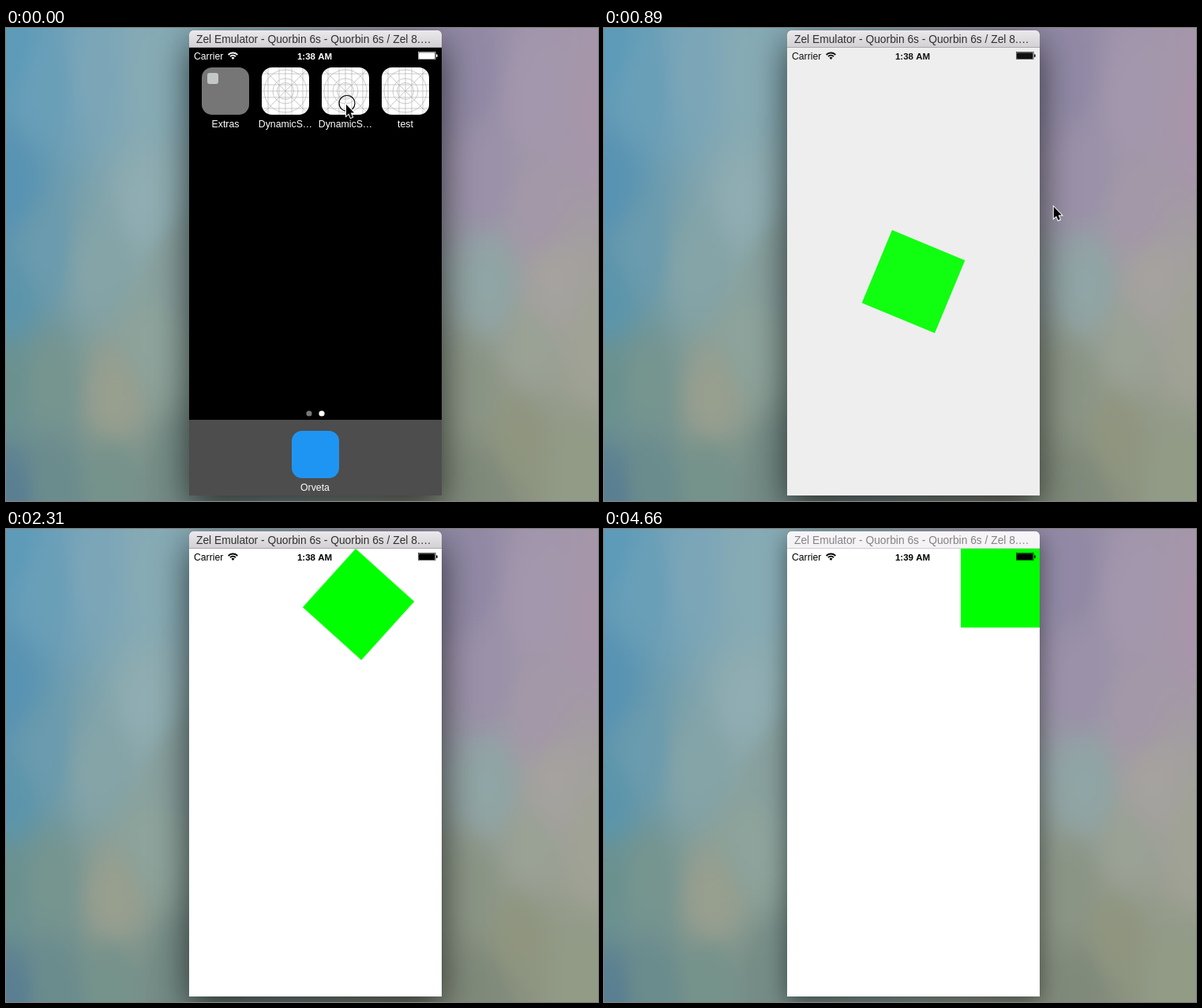
Recreate the animation shown at these times as an HTML page with a canvas. Size 750 by 600 pixels, loop 4680 ms.

```html
<!DOCTYPE html>
<html lang="en">
<head>
<meta charset="utf-8">
<title>Gravity demo</title>
<style>
  html, body { margin: 0; width: 100%; height: 100%; overflow: hidden; }
  canvas { display: block; width: 750px; height: 600px; }
</style>
</head>
<body>
<canvas id="stage" width="750" height="600"></canvas>
<script>
const LOOP = 4680;
const SCREEN = { x: 232, y: 25, w: 320, h: 568 };
const FONT = '"Liberation Sans", Arial, sans-serif';
const ctx = document.getElementById('stage').getContext('2d');

const clamp = v => Math.max(0, Math.min(1, v));
const mix = (a, b, p) => a + (b - a) * p;

// Piecewise linear track; each key is [time, ...values].
function track(keys, t) {
  const i = keys.findIndex(k => k[0] > t);
  if (i === 0) return keys[0].slice(1);
  if (i < 0) return keys[keys.length - 1].slice(1);
  const a = keys[i - 1], b = keys[i], p = (t - a[0]) / (b[0] - a[0]);
  return a.slice(1).map((v, n) => mix(v, b[n + 1], p));
}

const CURSOR = [[660, 431, 97], [890, 571, 228], [1170, 677, 312], [1340, 682, 317], [1500, 693, 336]];
const ANGLE = [[1442, 22.5], [1495, 0], [1740, -27], [2025, -39], [2310, -47.8], [2600, -58.5], [2880, -77], [2990, -90]];
const PIVOT = [[1495, 442], [2310, 443], [2880, 440.5], [2990, 440.5], [3400, 452]];

function roundRect(x, y, w, h, r, fill) {
  ctx.beginPath();
  ctx.roundRect(x, y, w, h, r);
  ctx.fillStyle = fill;
  ctx.fill();
}

function dot(x, y, r, fill) {
  ctx.beginPath();
  ctx.arc(x, y, r, 0, 7);
  ctx.fillStyle = fill;
  ctx.fill();
}

function text(str, x, y, size, fill, align = 'center', weight = '') {
  ctx.font = `${weight} ${size}px ${FONT}`;
  ctx.textAlign = align;
  ctx.fillStyle = fill;
  ctx.fillText(str, x, y);
}

// Blurred wallpaper: colours blended between a few points.
function makeWallpaper() {
  const points = [
    [0, 20, '5d9bb8'], [0, 200, '5893b3'], [0, 340, '5b95ac'], [0, 450, '6b918f'], [0, 595, '5a7f92'],
    [50, 70, '6a9fb8'], [45, 280, '6a9bae'], [50, 450, '76958f'], [60, 580, '6b8c8d'],
    [110, 60, '7ca6b8'], [110, 300, '84a4a8'], [135, 470, '989f8f'], [130, 570, '75928b'],
    [180, 60, '87abb5'], [180, 220, '8fadb2'], [185, 400, '8da39b'], [215, 300, '879f9d'], [210, 570, '758c86'],
    [580, 60, '9189a5'], [600, 190, '9b91a9'], [608, 325, '90a5a5'], [590, 450, '8b9586'], [600, 585, '808a7b'],
    [670, 90, 'a397ad'], [745, 110, 'a796aa'], [670, 235, 'a398a8'], [690, 320, 'a5a29f'],
    [745, 400, 'a1a296'], [660, 410, '9aa195'], [645, 510, '8f957f'], [725, 560, '919b86']
  ].map(([x, y, hex]) => [x, y, ...hex.match(/../g).map(c => parseInt(c, 16))]);
  const small = document.createElement('canvas');
  small.width = 150;
  small.height = 120;
  const g = small.getContext('2d');
  for (let y = 0; y < 120; y++) for (let x = 0; x < 150; x++) {
    const sum = [0, 0, 0];
    let total = 0;
    for (const [px, py, ...rgb] of points) {
      const d = (x * 5 - px) ** 2 + ((y * 5 - py) * 0.6) ** 2;
      const w = 1 / (d + 350) ** 2;
      total += w;
      rgb.forEach((c, i) => sum[i] += c * w);
    }
    g.fillStyle = `rgb(${sum.map(c => Math.round(c / total))})`;
    g.fillRect(x, y, 1, 1);
  }
  return small;
}
const wallpaper = makeWallpaper();

function drawWindow(active) {
  ctx.drawImage(wallpaper, 0, 0, 750, 600);
  ctx.save();
  ctx.shadowColor = `rgba(0,0,0,${active ? 0.65 : 0.5})`;
  ctx.shadowBlur = active ? 46 : 30;
  ctx.shadowOffsetY = active ? 16 : 9;
  roundRect(232, 3, 320, 590, [5, 5, 0, 0], '#000');
  ctx.restore();
  const bar = ctx.createLinearGradient(0, 3, 0, 25);
  bar.addColorStop(0, active ? '#ece9ec' : '#f7f5f7');
  bar.addColorStop(1, active ? '#d2d0d2' : '#f4f2f4');
  roundRect(232, 3, 320, 22, [5, 5, 0, 0], bar);
  ctx.fillStyle = active ? '#aaa8aa' : '#d0ced0';
  ctx.fillRect(232, 24, 320, 1);
  text('Zel Emulator - Quorbin 6s - Quorbin 6s / Zel 8.…', 241, 19, 13.8, active ? '#303030' : '#858385', 'left');
}

function drawStatus(color, time) {
  text('Carrier', 238, 39.5, 12.2, color, 'left');
  text(time, 391, 39.5, 11.5, color, 'center', 'bold');
  ctx.strokeStyle = color;
  ctx.lineWidth = 1.9;
  for (const r of [8, 4.8]) {
    ctx.beginPath();
    ctx.arc(287.5, 39.5, r, -Math.PI * 0.76, -Math.PI * 0.24);
    ctx.stroke();
  }
  ctx.beginPath();
  ctx.moveTo(287.5, 40);
  ctx.arc(287.5, 39.5, 2.7, -Math.PI * 0.76, -Math.PI * 0.24);
  ctx.fillStyle = color;
  ctx.fill();
  ctx.lineWidth = 0.6;
  ctx.strokeRect(522.3, 30.6, 21.8, 9);
  roundRect(523, 31.2, 20.4, 7.8, 1, color);
  roundRect(545, 33.2, 1.6, 3.8, 0.8, color);
}

function drawGridIcon(x) {
  ctx.save();
  roundRect(x, 50, 60, 60, 13, '#fff');
  ctx.clip();
  ctx.translate(x + 30, 80);
  ctx.strokeStyle = '#a8a8a8';
  ctx.lineWidth = 0.6;
  ctx.beginPath();
  for (const d of [-22, -8, 0, 8, 22]) {
    ctx.moveTo(d, -30); ctx.lineTo(d, 30);
    ctx.moveTo(-30, d); ctx.lineTo(30, d);
  }
  for (const s of [-1, 1]) { ctx.moveTo(-30, -30 * s); ctx.lineTo(30, 30 * s); }
  for (const r of [10.5, 16, 27]) { ctx.moveTo(r, 0); ctx.arc(0, 0, r, 0, 7); }
  ctx.stroke();
  ctx.restore();
}

function drawHome(p) {
  const { x, y, w, h } = SCREEN;
  ctx.globalAlpha = 1 - p;
  drawStatus('#fff', '1:38 AM');
  ctx.fillStyle = '#4d4d4d';
  ctx.fillRect(x, 497, w, 96);
  roundRect(362, 511, 60, 60, 13, '#1f95f3');
  text('Orveta', 391.5, 587, 12.3, '#fff');
  dot(384, 489, 3.6, '#777');
  dot(400, 489, 3.6, '#fff');

  // The tapped icon grows to the middle of the screen and carries its row along.
  ctx.save();
  ctx.translate(mix(430, 392, p), mix(80, 309, p));
  ctx.scale(mix(1, w / 60, p), mix(1, w / 60, p));
  ctx.translate(-430, -80);
  roundRect(248, 50, 60, 60, 13, '#767676');
  roundRect(255, 57, 14, 14, 3, '#c4c8c4');
  [324, 400, 476].forEach(drawGridIcon);
  ['Extras', 'DynamicS…', 'DynamicS…', 'test'].forEach((s, i) => text(s, 278 + 76 * i, 126, 12.3, '#fff'));
  ctx.restore();

  ctx.globalAlpha = p;
  roundRect(mix(400, x, p), mix(50, y, p), mix(60, w, p), mix(60, h, p), 13 * (1 - p), '#000');
  ctx.globalAlpha = 1;
}

// Falls upwards, hits the top edge, then tips over its leading corner into the corner of the screen.
function squarePose(t) {
  const [deg] = track(ANGLE, t), a = deg * Math.PI / 180;
  if (t < 1442) return { x: 392, y: 331.5 - 500 * Math.max(0, (t - 748) / 1000) ** 2, a };
  const c = Math.cos(a), s = Math.sin(a);
  const y = 25 + 50 * (c + Math.abs(s));
  return { x: t < 1495 ? 392 : track(PIVOT, t)[0] - 50 * (c + s), y, a };
}

function drawApp(t, time) {
  ctx.globalAlpha = clamp((t - 664) / 240);
  ctx.fillStyle = '#fff';
  ctx.fillRect(SCREEN.x, SCREEN.y, SCREEN.w, SCREEN.h);
  const { x, y, a } = squarePose(t);
  ctx.save();
  ctx.translate(x, y);
  ctx.rotate(a);
  ctx.fillStyle = '#0f0';
  ctx.fillRect(-50, -50, 100, 100);
  ctx.restore();
  drawStatus('#000', time);
  ctx.globalAlpha = 1;
}

function drawCursor(t) {
  const [x, y] = track(CURSOR, t);
  ctx.save();
  ctx.translate(x, y);
  ctx.beginPath();
  [[0, 0], [0, 14.5], [3.3, 11.6], [5.6, 17], [8, 16], [5.7, 10.6], [10, 10.4]].forEach(p => ctx.lineTo(...p));
  ctx.closePath();
  ctx.lineWidth = 2;
  ctx.strokeStyle = '#fff';
  ctx.stroke();
  ctx.fillStyle = '#000';
  ctx.fill();
  ctx.restore();
}

function draw(now) {
  const t = Math.floor((now - 654) / 57) * 57 + 660;
  drawWindow(now < 4660);
  ctx.save();
  ctx.beginPath();
  ctx.rect(SCREEN.x, SCREEN.y, SCREEN.w, SCREEN.h);
  ctx.clip();
  if (now < 660) {
    const p = clamp((t - 60) / 429);
    drawHome(p * p * (3 - 2 * p));
  } else {
    drawApp(t, now < 3700 ? '1:38 AM' : '1:39 AM');
  }
  ctx.restore();
  if (now < 60) {
    ctx.beginPath();
    ctx.arc(432, 95.5, 10, 0, 7);
    ctx.strokeStyle = '#000';
    ctx.lineWidth = 1.2;
    ctx.stroke();
  }
  if (now < 1740) drawCursor(t);
}

function tick() {
  draw(performance.now() % LOOP);
  requestAnimationFrame(tick);
}
tick();
</script>
</body>
</html>
```
